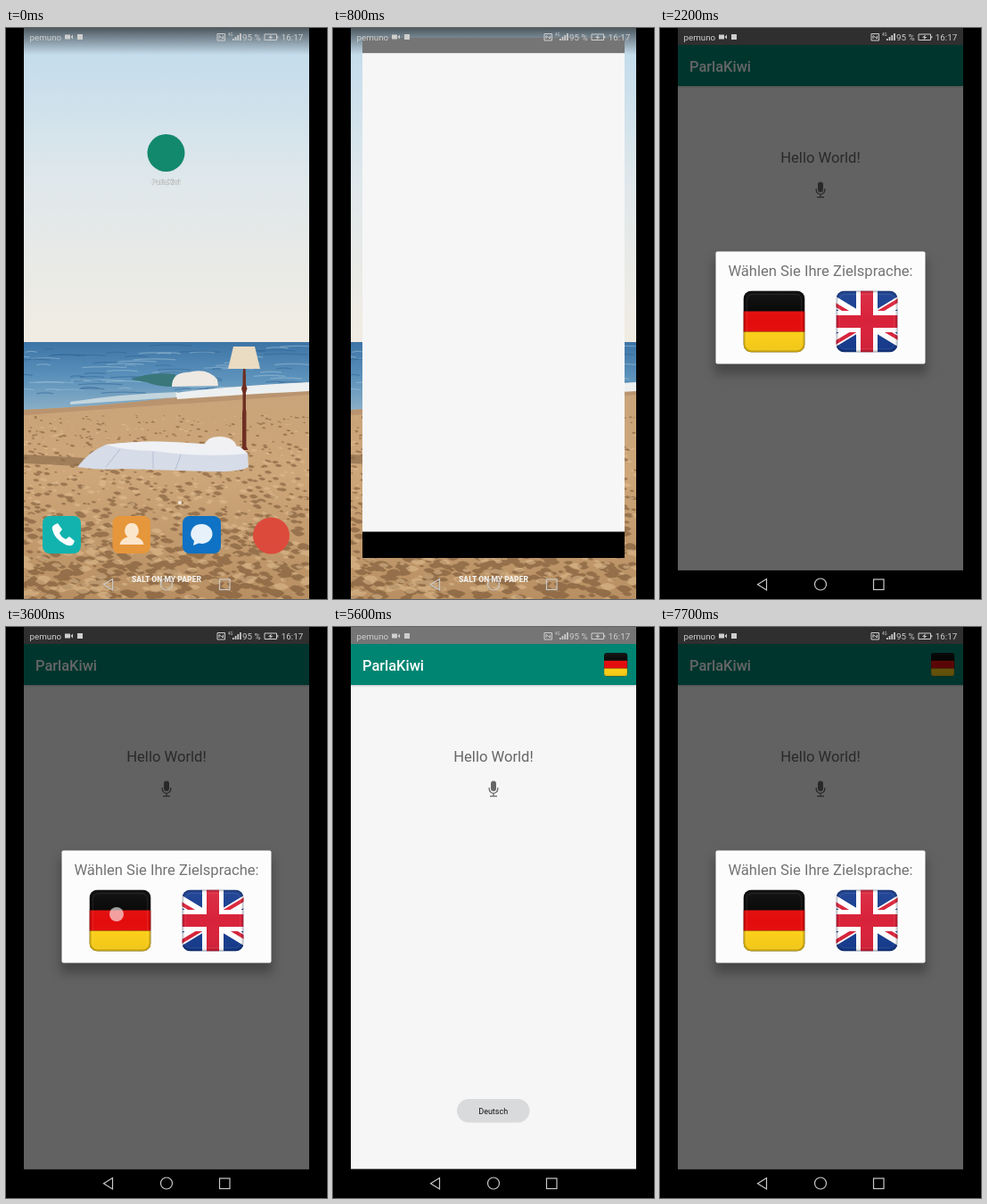
These frames come from a looping animation (360x640 px, 8 s). An HTML page:

```html
<!DOCTYPE html>
<html lang="de">
<head>
<meta charset="utf-8">
<title>ParlaKiwi</title>
<style>
html, body { margin: 0; width: 100%; height: 100%; overflow: hidden; background: #000; }
svg { display: block; width: 100%; height: 100%; font-family: Roboto, sans-serif; }
.mid { text-anchor: middle; }

#icons, #win, #app, #dim, #dialog, #pick, #toast, .tap { animation: 8s linear infinite; }
#icons { animation-name: icons; }
#win { animation-name: grow; }
#app { animation-name: app; }
#dim { animation-name: dim; }
#dialog { animation-name: dialog; }
#pick { animation-name: pick; }
#toast { animation-name: toast; }
#tap1 { animation-name: tap1; }
#tap2 { animation-name: tap2; }
#tap3 { animation-name: tap3; }

@keyframes icons { 0%, 6.25% { opacity: 1 } 8.75%, 100% { opacity: 0 } }
/* the window grows from the icon to the full screen */
@keyframes grow {
  0%, 6.2% { transform: translate(159px, 119px) scale(.131, .03); opacity: 0 }
  6.25% { transform: translate(159px, 119px) scale(.131, .03); opacity: 1;
          animation-timing-function: cubic-bezier(.5, 1, .89, 1) }
  11.65%, 100% { transform: translate(20px, 0px) scale(1, 1); opacity: 1 }
}
@keyframes app { 0%, 14.5% { opacity: 0 } 16.5%, 100% { opacity: 1 } }
@keyframes dim {
  0%, 21.6% { opacity: 0 } 22.5%, 45.5% { opacity: .6 }
  48%, 88.6% { opacity: 0 } 89.9%, 100% { opacity: .6 }
}
@keyframes dialog {
  0%, 20.4% { opacity: 0 } 22%, 45.25% { opacity: 1 }
  46.75%, 87.75% { opacity: 0 } 89.4%, 100% { opacity: 1 }
}
@keyframes pick { 0%, 45.9% { opacity: 0 } 46%, 100% { opacity: 1 } }
@keyframes toast { 0%, 46.6% { opacity: 0 } 48.75%, 70.1% { opacity: 1 } 73.1%, 100% { opacity: 0 } }
@keyframes tap1 { 0%, 1.2% { opacity: 0 } 1.25%, 4.5% { opacity: .6 } 5%, 100% { opacity: 0 } }
@keyframes tap2 { 0%, 41.2% { opacity: 0 } 41.25%, 45.1% { opacity: .6 } 46%, 100% { opacity: 0 } }
@keyframes tap3 { 0%, 82.4% { opacity: 0 } 82.5%, 86% { opacity: .6 } 87%, 100% { opacity: 0 } }
</style>
</head>
<body>
<svg viewBox="0 0 360 640">
  <defs>
    <linearGradient id="sky" x2="0" y2="1">
      <stop offset="0" stop-color="#bfdaec"/>
      <stop offset=".5" stop-color="#e0e8eb"/>
      <stop offset="1" stop-color="#f1ece2"/>
    </linearGradient>
    <linearGradient id="sea" x2="0" y2="1">
      <stop offset="0" stop-color="#3c74a6"/>
      <stop offset=".5" stop-color="#5c92bb"/>
      <stop offset="1" stop-color="#8fb2c8"/>
    </linearGradient>
    <linearGradient id="sand" x2="0" y2="1">
      <stop offset="0" stop-color="#c9a47a"/>
      <stop offset=".4" stop-color="#cda679"/>
      <stop offset="1" stop-color="#b78f62"/>
    </linearGradient>
    <linearGradient id="shade" x2="0" y2="1">
      <stop offset="0" stop-opacity=".6"/>
      <stop offset="1" stop-opacity="0"/>
    </linearGradient>
    <linearGradient id="gloss" x2="0" y2="1">
      <stop offset="0" stop-color="#fff" stop-opacity=".07"/>
      <stop offset=".5" stop-color="#fff" stop-opacity="0"/>
      <stop offset="1" stop-opacity=".06"/>
    </linearGradient>
    <filter id="soft" x="-20%" y="-20%" width="140%" height="150%"><feGaussianBlur stdDeviation="6"/></filter>
    <filter id="thin" x="-5%" y="-50%" width="110%" height="200%"><feGaussianBlur stdDeviation="1"/></filter>
    <clipPath id="tile"><rect width="69" height="69" rx="9"/></clipPath>
    <clipPath id="screen"><rect x="20" width="320" height="640"/></clipPath>
    <g id="bevel" fill="none">
      <rect width="69" height="69" rx="9" fill="url(#gloss)"/>
      <rect x="1" y="1" width="67" height="67" rx="8" stroke="#000" stroke-opacity=".2" stroke-width="2"/>
      <rect x="4" y="4" width="61" height="61" rx="6" stroke="#fff" stroke-opacity=".08"/>
    </g>
    <g id="de" clip-path="url(#tile)">
      <rect width="69" height="69" fill="#040404"/>
      <rect y="23" width="69" height="23" fill="#e30c0c"/>
      <rect y="46" width="69" height="23" fill="#fdd017"/>
      <use href="#bevel"/>
    </g>
    <g id="uk" clip-path="url(#tile)">
      <rect width="69" height="69" fill="#163c8f"/>
      <path d="M-6 10L75 59M75 10L-6 59" stroke="#fff" stroke-width="12"/>
      <path d="M-6 12.500L34 36.500M75 56.500L35 32.500M75 7.500L35 31.500M-6 61.500L34 37.500" stroke="#d8223a" stroke-width="4"/>
      <path d="M34.5 0V69M0 34.5H69" stroke="#fff" stroke-width="24"/>
      <path d="M34.5 0V69M0 34.5H69" stroke="#d8223a" stroke-width="14"/>
      <use href="#bevel"/>
    </g>
  </defs>

  <!-- home screen -->
  <g clip-path="url(#screen)">
    <rect x="20" width="320" height="353" fill="url(#sky)"/>
    <rect x="20" y="352" width="320" height="80" fill="url(#sea)"/>
    <g id="ripples" fill="none" stroke-width="1.2"></g>
    <path d="M20 428Q110 424 190 414T340 406V640H20Z" fill="url(#sand)"/>
    <path d="M20 428Q110 424 190 414T340 406V411Q260 417 200 421T20 434Z" fill="#b9946f"/>
    <path d="M140 394Q160 385 190 388V402Q168 402 158 397Z" fill="#39777a"/>
    <path d="M72 419Q130 410 192 408V414Q130 418 72 422Z" fill="#c3d5dd"/>
    <path d="M186 402Q186 386 204 386Q226 380 237 394L238 401Z" fill="#eee9e2"/>
    <path d="M190 409Q240 402 340 397V407Q260 411 192 416Z" fill="#edf0f0"/>
    <path id="dark" fill="#6f4d2e" fill-opacity=".5"/>
    <path id="light" fill="#e3c194" fill-opacity=".5"/>
    <path d="M20 478L90 482L82 491L20 488Z" fill="#8f6e4d" fill-opacity=".7"/>
    <path d="M266 382h2.500l.5 9v9l1.500 4-1.500 5v18l.5 4v38l2 4h-8.500l2-4v-38l.5-4v-18l-1.500-5 1.500-4v-9Z" fill="#6e2f22"/>
    <path d="M255 357H279L285 382H249Z" fill="#eadbc3"/>
    <path d="M80 492Q94 474 112 467Q150 462 186 464L262 469L271 477L272 492Q262 498 225 497L130 494Q104 496 80 492Z" fill="#d6dce8"/>
    <path d="M112 467Q150 462 186 464L262 469L271 477Q220 482 165 474Q135 474 112 467Z" fill="#eff1f5"/>
    <path d="M222 468Q226 457 240 458Q258 459 259 471Q240 476 222 468Z" fill="#f1f1f3"/>
    <path d="M165 475V494M196 478L190 495M128 472L112 492" stroke="#b4bfd2" fill="none"/>
    <rect x="20" width="320" height="30" fill="url(#shade)"/>
    <text class="mid" x="180" y="620.500" font-size="8.600" font-weight="900" fill="#f4efe8">SALT ON MY PAPER</text>
    <g id="icons">
      <circle cx="179.5" cy="140" r="21" fill="#12886c"/>
      <text class="mid" x="179.5" y="175" font-size="7.6" fill="#fff" stroke="#555" stroke-opacity=".4" stroke-width="1" paint-order="stroke">ParlaKiwi</text>
      <circle cx="195" cy="532" r="2" fill="#fff" fill-opacity=".8"/>
      <rect x="41" y="547" width="43" height="42" rx="8" fill="#12b3ae"/>
      <path d="M54 557l4-2 5 7-3 4q2 5 7 7l4-3 6 5-2 4q-4 3-10-1-11-6-13-16Q51 559 54 557Z" fill="#fff"/>
      <rect x="119.500" y="547" width="42.500" height="42" rx="8" fill="#e6963b"/>
      <path d="M141 555a7.500 8.500 0 0 1 4.500 15.500q8 2 9 8.500h-27q1-6.500 9-8.500a7.500 8.500 0 0 1 4.500-15.500Z" fill="#fbe6cc"/>
      <rect x="198" y="547" width="43" height="42" rx="8" fill="#0f72c4"/>
      <path d="M219 556a12 11 0 1 1-3 21.500l-6 2.500 1-5a12 11 0 0 1 8-19Z" fill="#e6f1fa"/>
      <circle cx="297.500" cy="569" r="20.500" fill="#dc4a3c"/>
    </g>
    <circle class="tap" id="tap1" cx="181" cy="146" r="8" fill="#fff"/>
  </g>

  <!-- app -->
  <g id="win">
    <rect width="320" height="640"/>
    <rect width="320" height="19" fill="#757575"/>
    <rect y="19" width="320" height="588.500" fill="#f6f6f6"/>
  </g>
  <g id="app">
    <rect x="20" y="62" width="320" height="4" fill-opacity=".2" filter="url(#thin)"/>
    <rect x="20" y="19" width="320" height="46" fill="#008573"/>
    <text x="33" y="49" font-size="16.4" font-weight="500" fill="#fff">ParlaKiwi</text>
    <g id="pick"><use href="#de" transform="translate(304 29) scale(.38)"/></g>
    <text class="mid" x="180" y="150.500" font-size="16.6" fill="#666">Hello World!</text>
    <g fill="none" stroke="#666" stroke-width="1.3">
      <rect x="177" y="172.500" width="6" height="11.500" rx="3" fill="#666" stroke="none"/>
      <path d="M175.200 180v1.500a4.800 4.800 0 0 0 9.600 0V180M180 186.300v3.400M176 189.700h8"/>
    </g>
  </g>
  <rect id="dim" x="20" width="320" height="607.500"/>
  <g id="dialog">
    <rect x="61" y="258" width="238" height="130" fill-opacity=".28" filter="url(#soft)"/>
    <rect x="62.500" y="250.500" width="235" height="126" rx="2" fill="#fcfcfc"/>
    <text class="mid" x="180" y="277.500" font-size="16.6" fill="#737373">Wählen Sie Ihre Zielsprache:</text>
    <use href="#de" x="93.500" y="294.500"/>
    <use href="#uk" x="197.500" y="294.500"/>
  </g>
  <g id="toast">
    <rect x="139" y="529" width="81.500" height="26.500" rx="13.250" fill="#d9dadb"/>
    <text class="mid" x="179.700" y="545.500" font-size="9" fill="#111">Deutsch</text>
  </g>
  <circle class="tap" id="tap2" cx="124" cy="322" r="8" fill="#fff"/>
  <circle class="tap" id="tap3" cx="317" cy="42" r="8" fill="#fff"/>

  <!-- system bars -->
  <g fill="#cecece" font-size="9.800">
    <text x="26.500" y="13.500">pemuno</text>
    <path d="M66 7.500h6v5h-6ZM72.500 10l2.500-2.500v5Z"/>
    <rect x="80" y="7" width="6" height="6"/>
    <path d="M237 6.500h8.500v7.500H237ZM239 12V8.500l4.500 3.500V8.500" fill="none" stroke="#cecece"/>
    <text x="249" y="8.500" font-size="4.500">4G</text>
    <path d="M254 14v-2h1.700v2ZM256.700 14v-4h1.700v4ZM259.400 14V8h1.700v6ZM262.100 14V6h1.700v8Z"/>
    <text x="265" y="13.500">95 %</text>
    <path d="M290 7h13.500v6.500H290ZM304.800 9v2.500" fill="none" stroke="#cecece"/>
    <path d="M298 7.500l-4 3.200h2.500l-1 2.500 4-3.200H297Z"/>
    <text x="308.800" y="13.500">16:17</text>
  </g>
  <g fill="none" stroke="#c8c8c8" stroke-width="1.200">
    <path d="M119.500 617.500V630L109.500 623.700Z"/>
    <circle cx="180" cy="623.500" r="6.500"/>
    <rect x="239.500" y="618" width="11.500" height="11.500"/>
  </g>
</svg>
<script>
let seed = 7;
const rnd = () => (seed = seed * 16807 % 2147483647) / 2147483647;

// footprints in the sand, larger towards the viewer
function dents(id, count) {
  let d = '';
  for (let i = 0; i < count; i++) {
    const depth = rnd(), x = 20 + 320 * rnd(), y = 434 + 206 * depth;
    const w = (1.5 + 5 * depth) * (.5 + rnd()), h = w * .36;
    d += `M${x - w} ${y}q${w} ${-2 * h} ${2 * w} ${h / 2}q${-w} ${2.4 * h} ${-2 * w} ${-h / 2}`;
  }
  document.getElementById(id).setAttribute('d', d);
}

function ripples(count) {
  let s = '';
  for (let i = 0; i < count; i++) {
    const x = 10 + 310 * rnd(), y = 356 + 54 * rnd(), w = 10 + 40 * rnd();
    const tone = i % 2 ? '#2f6291' : '#a4c4d8';
    s += `<path d="M${x} ${y}q${w / 2} -2 ${w} 0" stroke="${tone}" opacity=".5"/>`;
  }
  document.getElementById('ripples').innerHTML = s;
}

ripples(80);
dents('dark', 900);
dents('light', 400);
</script>
</body>
</html>
```
